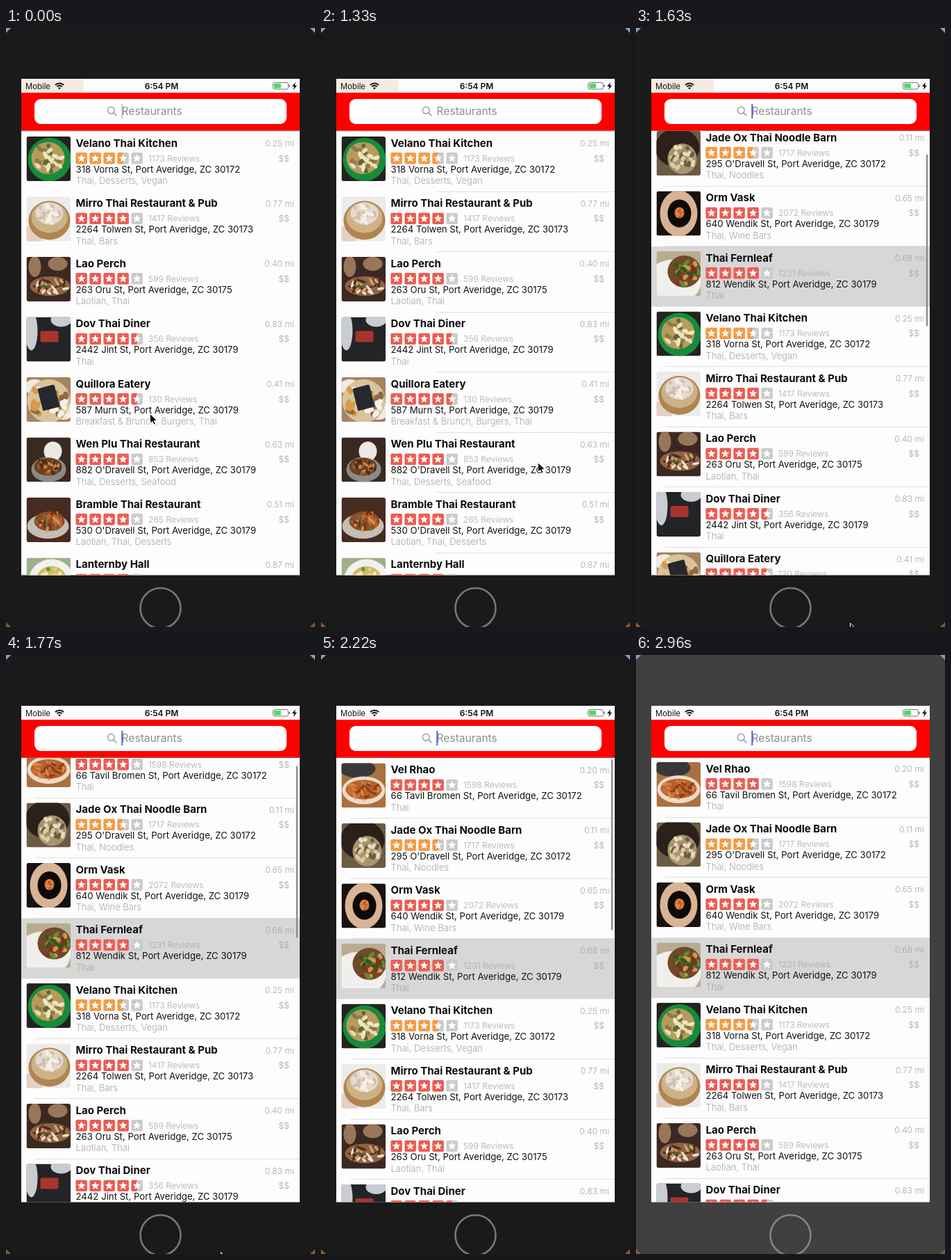
An HTML page with a canvas that plays this animation: 445 px wide and 861 px high, repeating every 3060 ms.

```html
<!DOCTYPE html>
<html lang="en">
<meta charset="utf-8">
<title>Restaurant list</title>
<style>
html, body { margin: 0; width: 445px; height: 861px; overflow: hidden; }
canvas { display: block; }
</style>
<canvas id="stage" width="445" height="861"></canvas>
<script>
const c = document.getElementById('stage').getContext('2d');
const LOOP = 3060, PITCH = 86.5, TOP = 163;
const RED = '#ee5b51', ORANGE = '#f69a42', GRAY = '#cbcbcb';

// Photos: background, ellipses [color, x, y, rx, ry], crumbs scattered in the last ellipse
const rows = [
  { name: 'Vel Rhao', stars: 4, reviews: 1598, street: '66 Tavil Bromen St', zip: 30172, tags: 'Thai', miles: '0.20',
    photo: ['#a8713f', ['#38383b', 23, 8, 26, 13], ['#eadbc8', 32, 39, 31, 20], ['#b9602b', 32, 38, 26, 14]], crumbs: ['#d98a45', '#8f3f1c', '#c9713a'] },
  { name: 'Jade Ox Thai Noodle Barn', stars: 3.5, reviews: 1717, street: "295 O'Dravell St", zip: 30172, tags: 'Thai, Noodles', miles: '0.11',
    photo: ['#6b5b45', ['#2b211a', 30, 24, 32, 28], ['#a8946f', 37, 40, 21, 22]], crumbs: ['#dccba4', '#6e5c40', '#e9dcbc'] },
  { name: 'Orm Vask', stars: 4, reviews: 2072, street: '640 Wendik St', zip: 30179, tags: 'Thai, Wine Bars', miles: '0.65',
    photo: ['#17110f', ['#d8b394', 32, 32, 27, 33], ['#0d0a0a', 33, 32, 17, 20], ['#d9743a', 33, 31, 7, 8]], crumbs: ['#ec9455', '#b9552a'] },
  { name: 'Thai Fernleaf', stars: 4, reviews: 1231, street: '812 Wendik St', zip: 30179, tags: 'Thai', miles: '0.68',
    photo: ['#b9ab90', ['#f1efec', 24, 44, 40, 32], ['#6e4a28', 40, 29, 24, 23]], crumbs: ['#5f8a35', '#8f2a1e', '#c99a50', '#36541f'] },
  { name: 'Velano Thai Kitchen', stars: 3.5, reviews: 1173, street: '318 Vorna St', zip: 30172, tags: 'Thai, Desserts, Vegan', miles: '0.25',
    photo: ['#24241e', ['#178a3c', 33, 33, 31, 31], ['#b59c5c', 31, 31, 24, 23]], crumbs: ['#f1e6c2', '#8d7a44', '#eadcb4', '#5f6a34'] },
  { name: 'Mirro Thai Restaurant & Pub', stars: 4, reviews: 1417, street: '2264 Tolwen St', zip: 30173, tags: 'Thai, Bars', miles: '0.77',
    photo: ['#ebebea', ['#e3d0c4', 8, 56, 16, 14], ['#b0854f', 33, 34, 30, 28], ['#cdb288', 33, 30, 26, 22], ['#e4dacd', 33, 24, 20, 16]], crumbs: ['#f6efe6', '#cdbfae'] },
  { name: 'Lao Perch', stars: 4, reviews: 599, street: '263 Oru St', zip: 30175, tags: 'Laotian, Thai', miles: '0.40',
    photo: ['#3c2822', ['#97765a', 12, 14, 9, 15], ['#97765a', 45, 10, 14, 10], ['#8f6445', 34, 42, 29, 14]], crumbs: ['#ede2d4', '#5a261c', '#4b5f30', '#d9a069'] },
  { name: 'Dov Thai Diner', stars: 4.5, reviews: 356, street: '2442 Jint St', zip: 30179, tags: 'Thai', miles: '0.83',
    photo: ['#232427', ['#c9ccd1', 7, 20, 9, 28], ['#c9ccd1', 50, 4, 15, 10]], block: ['#a8352b', 20, 20, 26, 16] },
  { name: 'Quillora Eatery', stars: 4.5, reviews: 130, street: '587 Murn St', zip: 30179, tags: 'Breakfast & Brunch, Burgers, Thai', miles: '0.41',
    photo: ['#a58460', ['#efeae2', 12, 14, 15, 11], ['#efeae2', 54, 48, 15, 13], ['#d9c39c', 32, 34, 31, 31]], crumbs: ['#f4f0ea', '#d79a48', '#8f6a44'], block: ['#26282e', 20, 13, 25, 33], tilt: -.25 },
  { name: 'Wen Plu Thai Restaurant', stars: 4, reviews: 853, street: "882 O'Dravell St", zip: 30179, tags: 'Thai, Desserts, Seafood', miles: '0.63',
    photo: ['#382921', ['#8c8a88', 32, 46, 25, 18], ['#ece8e4', 38, 20, 13, 14], ['#70401f', 31, 42, 20, 13]], crumbs: ['#9b5f2e', '#4a2816', '#c28c56'] },
  { name: 'Bramble Thai Restaurant', stars: 4, reviews: 265, street: "530 O'Dravell St", zip: 30179, tags: 'Laotian, Thai, Desserts', miles: '0.51',
    photo: ['#482b20', ['#c4beb4', 31, 41, 30, 18], ['#8c4c28', 33, 34, 22, 14]], crumbs: ['#c9622e', '#5f7c32', '#7a2a1a', '#c99a55'] },
  { name: 'Lanternby Hall', stars: 4, reviews: 742, street: '475 Murn St', zip: 30179, tags: 'Thai', miles: '0.87',
    photo: ['#9db08a', ['#f1f2ee', 36, 34, 33, 32], ['#cdbb62', 36, 32, 22, 20]], crumbs: ['#5f9440', '#e4cf7c', '#f0e6bd'] }
];

// Keys are counted in ticks
const scrollKeys = [[9, -181], [10, -21], [11, 70.5], [12, 135], [13, 168.5], [14, 168.5], [15, 164.5], [16, 163.5], [17, TOP]];
const caretKeys = [[0, .35], [1, 0], [2, 0], [3, .6], [4, .95], [6, 1], [7, .3], [8, 0], [9, 0], [10, 1], [16, 1], [17, .3], [18, 0], [19, 0], [20, 1]];
const pointer = { 0: [207, 554], 1: [293, 786], 7: [343, 690], 8: [297, 563], 9: [312, 624], 10: [304, 836], 11: [308, 855], 12: [309, 858] };

function valueAt(keys, x) {
  if (x <= keys[0][0]) return keys[0][1];
  for (let i = 1; i < keys.length; i++) {
    const [x0, y0] = keys[i - 1], [x1, y1] = keys[i];
    if (x <= x1) return y0 + (y1 - y0) * (x - x0) / (x1 - x0);
  }
  return keys[keys.length - 1][1];
}

function tickAt(ms) {
  let k = 0;
  while (Math.round(14.78 * (k + 1)) * 10 <= ms) k++;
  return k;
}

function rect(color, x, y, w, h, r = 0) {
  c.fillStyle = color;
  c.beginPath();
  c.roundRect(x, y, w, h, r);
  c.fill();
}

function oval(color, x, y, rx, ry, turn = 0) {
  c.fillStyle = color;
  c.beginPath();
  c.ellipse(x, y, rx, ry, turn, 0, 7);
  c.fill();
}

function text(s, x, y, size, color, weight = 400, align = 'left') {
  c.font = `${weight} ${size}px Inter, Roboto, sans-serif`;
  c.textAlign = align;
  c.fillStyle = color;
  c.fillText(s, x, y);
}

function clipTo(x, y, w, h, r, draw) {
  c.save();
  c.beginPath();
  c.roundRect(x, y, w, h, r);
  c.clip();
  draw();
  c.restore();
}

function drawPhoto(row, i, y) {
  clipTo(29.5, y, 63.5, 64, 3, () => {
    c.translate(29.5, y);
    const [back, ...ovals] = row.photo;
    rect(back, 0, 0, 64, 64);
    for (const o of ovals) oval(...o);
    let seed = i * 97 + 13;
    const rnd = () => (seed = seed * 16807 % 2147483647) / 2147483647;
    const [, x0, y0, rx, ry] = ovals[ovals.length - 1];
    if (row.crumbs) for (let n = 0; n < 26; n++) {
      const a = rnd() * 6.28, d = Math.sqrt(rnd()) * .85;
      oval(row.crumbs[n % row.crumbs.length], x0 + rx * d * Math.cos(a), y0 + ry * d * Math.sin(a), rx * (.12 + .16 * rnd()), ry * .13, rnd() * 3);
    }
    if (row.block) {
      c.translate(32, 32);
      c.rotate(row.tilt || 0);
      c.translate(-32, -32);
      rect(...row.block, 2);
    }
  });
}

function drawStars(count, y) {
  const color = count < 4 ? ORANGE : RED;
  for (let i = 0; i < 5; i++) {
    const x = 100.3 + i * 20, part = Math.max(0, Math.min(1, count - i));
    clipTo(x, y, 16.6, 16.4, 2.5, () => {
      rect(GRAY, x, y, 17, 17);
      rect(color, x, y, 16.6 * part, 17);
    });
    c.fillStyle = '#fff';
    c.beginPath();
    for (let p = 0; p < 10; p++) {
      const r = p % 2 ? 2.7 : 6.2, a = p * Math.PI / 5;
      c.lineTo(x + 8.3 + r * Math.sin(a), y + 8.5 - r * Math.cos(a));
    }
    c.fill();
  }
}

function drawRow(row, i, y, k) {
  if (row.name === 'Thai Fernleaf') rect('#d7d7d7', 22, y - 16, 401, PITCH);
  else if (k) {
    const x = k < 10 ? 166 : 42;
    rect('#dfdfe1', x, Math.round(y + 69.5), 423 - x, 1);
  }
  drawPhoto(row, i, y - 9);
  text(row.name, 100.5, y + 5.5, 15, '#0c0c0c', 700);
  drawStars(row.stars, y + 14);
  text(row.reviews + ' Reviews', 205, y + 26.5, 12.2, '#a9a9a9', 300);
  text(`${row.street}, Port Averidge, ZC ${row.zip}`, 100.5, y + 42.5, 13.2, '#111');
  text(row.tags, 100.5, y + 59, 13, '#a6a6a6', 300);
  text(row.miles + ' mi', 415, y + 5, 12.2, '#a6a6a6', 300, 'right');
  text('$$', 408, y + 26.5, 12.2, '#a6a6a6', 300, 'right');
}

function drawStatusBar(k) {
  rect('#fdfdfd', 22, 73, 401, 20);
  if (k < 12) rect('#f6ebe2', 22, 73, 90, 20);
  text('Mobile', 28, 88, 11.3, '#111');
  text('6:54 PM', 224, 88, 12, '#111', 600, 'center');
  c.strokeStyle = '#111';
  c.lineWidth = 1.9;
  for (const r of [8.5, 5.2]) {
    c.beginPath();
    c.arc(77, 88, r, -2.36, -.78);
    c.stroke();
  }
  c.fillStyle = '#111';
  c.beginPath();
  c.moveTo(77, 88.5);
  c.arc(77, 88, 2.7, -2.36, -.78);
  c.fill();
  c.strokeStyle = '#777';
  c.lineWidth = 1;
  c.beginPath();
  c.roundRect(384.5, 78.5, 22, 9.5, 2.5);
  c.stroke();
  rect('#4cd964', 386, 80, 10, 6.5, 1);
  rect('#777', 407.5, 81.5, 1.5, 3.5, 1);
  c.fillStyle = '#111';
  c.fill(new Path2D('M417 78l-5 6h3l-1 5 5-6.500h-3z'));
}

function drawSearch(k) {
  rect('#f00', 22, 93, 401, 54.5);
  rect('#fff', 41, 102, 363, 36, 9);
  c.strokeStyle = '#8e8e93';
  c.lineWidth = 1.3;
  c.beginPath();
  c.arc(151.3, 118.3, 4.9, 0, 7);
  c.moveTo(154.8, 121.8);
  c.lineTo(159.5, 126.3);
  c.stroke();
  text('Restaurants', 166.5, 125, 15.6, '#8e8e93');
  c.globalAlpha = valueAt(caretKeys, k);
  rect('#4468dc', 166.3, 109, 2, 21);
  c.globalAlpha = 1;
}

function drawList(k) {
  const scroll = valueAt(scrollKeys, k);
  clipTo(22, 147.5, 401, 639, 0, () => {
    rect('#fdfdfd', 22, 147, 401, 640);
    rows.forEach((row, i) => {
      const y = scroll + i * PITCH;
      if (y > 70 && y < 810) drawRow(row, i, y, k);
    });
    if (k < 10 || k > 17) return;
    c.globalAlpha = k === 17 ? .5 : 1;
    rect('#8b8b8b', 417.8, 150 + .34 * Math.max(0, TOP - scroll), 2.4, 247 - Math.max(0, scroll - TOP), 1.2);
    c.globalAlpha = 1;
  });
}

function drawPhone(k) {
  rect('#8ca2c2', 0, 0, 445, 430);
  rect('#8a5a35', 0, 430, 445, 431);
  rect(k < 16 ? '#1a1a1a' : '#404040', -17, -17, 479, 895, 70);
  c.strokeStyle = k < 16 ? '#777' : '#858585';
  c.lineWidth = 2.6;
  c.beginPath();
  c.arc(222.5, 834, 29, 0, 7);
  c.stroke();
}

function drawPointer(k) {
  if (!pointer[k]) return;
  c.save();
  c.translate(...pointer[k]);
  const arrow = new Path2D('M.5.5V14.200L3.700 11.200 6 16.300 8.300 15.300 6.100 10.400H10.500Z');
  c.fillStyle = '#000';
  c.fill(arrow);
  c.strokeStyle = '#fff';
  c.lineWidth = 1;
  c.stroke(arrow);
  c.restore();
}

const start = performance.now();
function frame() {
  const k = tickAt((performance.now() - start) % LOOP);
  drawPhone(k);
  drawList(k);
  drawStatusBar(k);
  drawSearch(k);
  drawPointer(k);
  requestAnimationFrame(frame);
}
frame();
</script>
</html>
```
